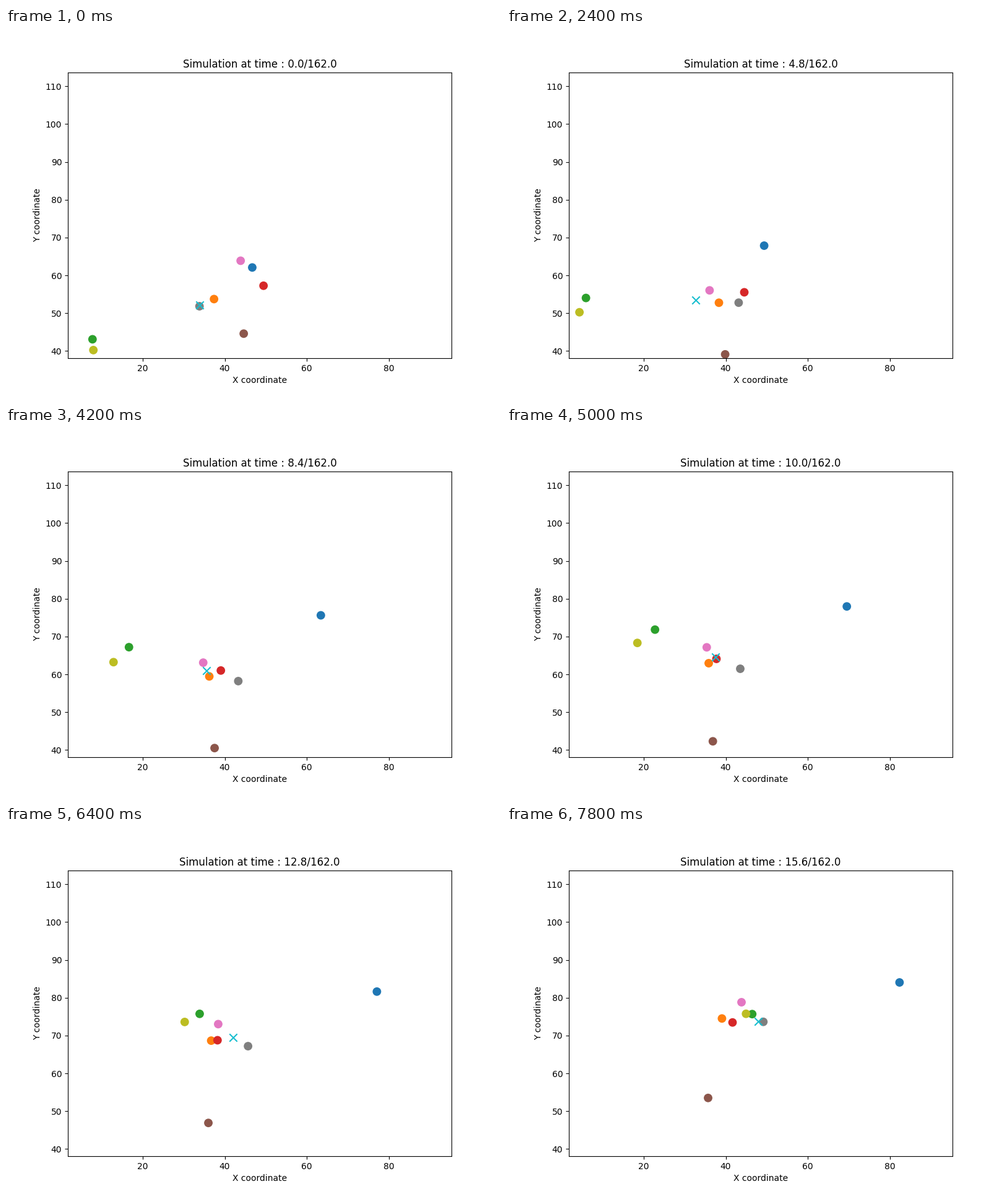
A matplotlib script for the animation above (8 s loop, 800 by 600 pixels).

```python
import numpy as np
import matplotlib.pyplot as plt
from matplotlib.animation import FuncAnimation

STEP_MS, FRAMES = 200, 40
DT = 0.4  # simulated time per step

# Each agent glides through five key points (stage pixels), reached at KEYS (s).
KEYS = np.array([0, 1, 2.4, 5, 7.8])
PATHS = {
    "C0": [(398, 387.3), (383, 419.8), (415.6, 352), (549.2, 290.2), (634.4, 253)],
    "C1": [(336.2, 438.4), (350.7, 453), (342.5, 444.3), (326, 382), (347.4, 311.3)],
    "C2": [(139.8, 503.4), (114, 482), (127.6, 436.6), (239.2, 327.7), (396.3, 304.2)],
    "C3": [(416.2, 416.8), (410.5, 422.4), (383.5, 427.4), (338.5, 375), (364.5, 317.7)],
    "C5": [(384.2, 494.3), (373.7, 515.4), (352.6, 527.8), (332.7, 508.3), (325, 439.8)],
    "C6": [(379.2, 376.4), (348, 410.4), (327.4, 424.3), (322.8, 356.3), (379, 285)],
    "C7": [(312.7, 450), (354.4, 441.8), (374.4, 444.2), (377, 391), (414.3, 316.7)],
    "C8": [(141.2, 520.9), (107, 494.7), (117.1, 459.7), (210.7, 349.2), (386.3, 303.7)],
}

fig, ax = plt.subplots(figsize=(8, 6), dpi=100)
ax.set_xlim(1.788, 95.225)
ax.set_ylim(38.087, 113.647)
ax.set_xlabel("X coordinate")
ax.set_ylabel("Y coordinate")
title = ax.set_title("")


def to_data(points):
    """Stage pixels (y down) to axes coordinates."""
    flipped = np.array(points, float) * [1, -1] + [0, 600]
    flat = ax.transData.inverted().transform(flipped.reshape(-1, 2))
    return flat.reshape(flipped.shape)


POINTS = to_data(list(PATHS.values()))
SLOPES = np.gradient(POINTS, KEYS, axis=1, edge_order=2)


def positions(t):
    """Cubic Hermite position of every agent at time t."""
    i = min(np.searchsorted(KEYS, t, side="right"), len(KEYS) - 1) - 1
    h = KEYS[i + 1] - KEYS[i]
    u = (t - KEYS[i]) / h
    v = 1 - u
    return (v * v * ((1 + 2 * u) * POINTS[:, i] + u * h * SLOPES[:, i])
            + u * u * ((1 + 2 * v) * POINTS[:, i + 1] - v * h * SLOPES[:, i + 1]))


start = positions(0)
agents = ax.scatter(*start.T, s=80, c=list(PATHS))
center = ax.scatter(*start.mean(axis=0), s=80, c="C9", marker="x")


def update(n):
    now = positions(n * STEP_MS / 1000)
    agents.set_offsets(now)
    center.set_offsets([now.mean(axis=0)])
    title.set_text(f"Simulation at time : {n * DT:.1f}/162.0")
    return agents, center, title


anim = FuncAnimation(fig, update, frames=FRAMES, interval=STEP_MS,
                     repeat=True, repeat_delay=0, blit=False)
plt.show()
```
